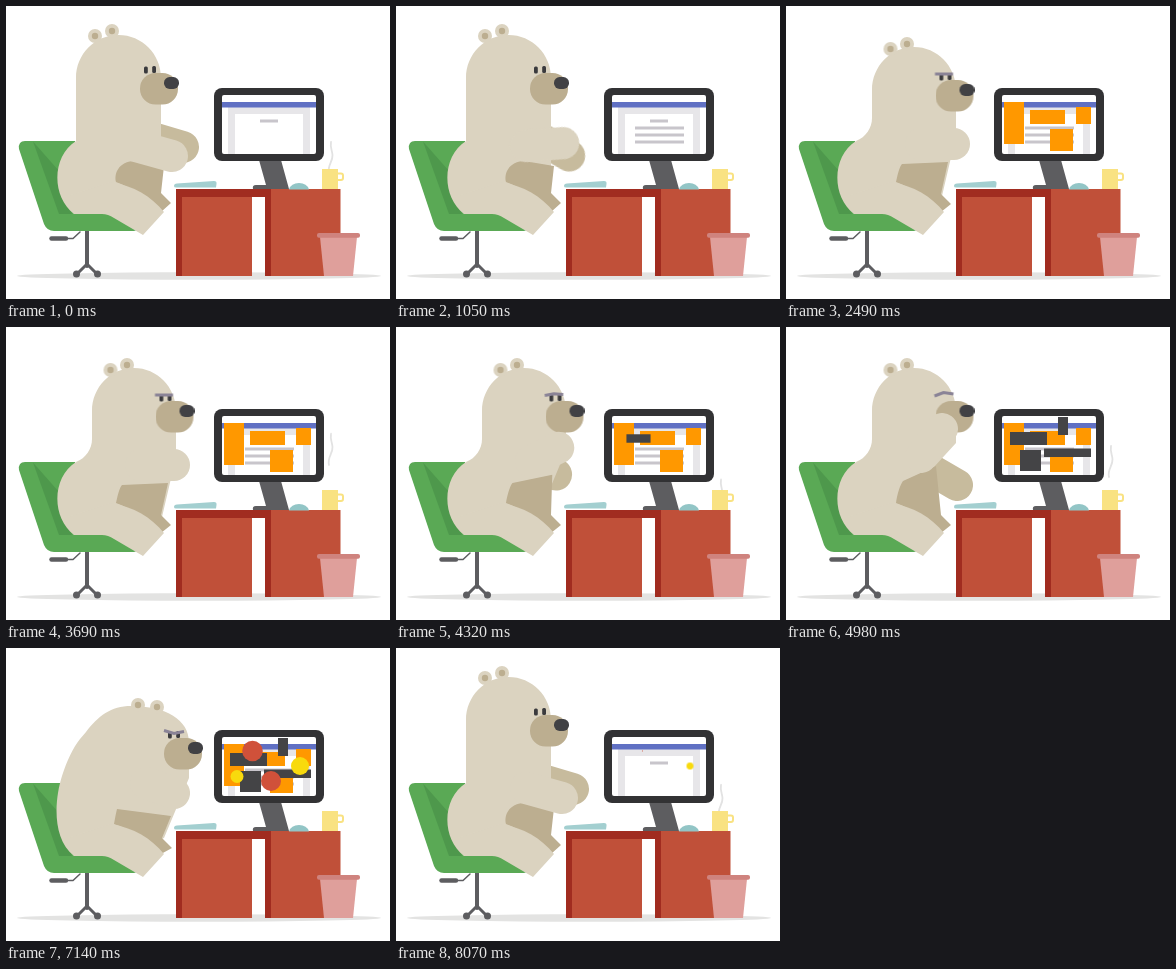
Animation, 384 px wide and 293 px high, one loop 8100 ms. Source, as an HTML page without scripts:

```html
<!DOCTYPE html>
<html lang="en">
<head>
<meta charset="utf-8">
<title>Bear at a desk</title>
<style>
html, body { margin: 0; width: 100%; height: 100%; overflow: hidden; background: #fff; }
svg { display: block; width: 100%; height: 100%; }

/* Poses: a upright, b leaning, d facepalm, u lift, c hunched */
.shape, .shift { animation: 8.1s ease-in-out infinite shape; }
.shift { animation-name: shift; }
@keyframes shape {
  0%, 21.6%, 98.5%, 100% { d: var(--a); }
  27.2%, 51.2%, 67.9%, 71.6% { d: var(--b); }
  55.6%, 63% { d: var(--d); }
  73.3% { d: var(--u, var(--b)); }
  75.6%, 93.7% { d: var(--c); }
}
@keyframes shift {
  0%, 21.6%, 98.5%, 100% { transform: var(--a); }
  27.2%, 51.2%, 55.6%, 63%, 67.9%, 71.6% { transform: var(--b); }
  73.3% { transform: var(--u); }
  75.6%, 93.7% { transform: var(--c); }
}

.body {
  --a: path("M68 208C45 190 46 150 70 135C70 133 70 126 70 120L70 72C70 48 89 29 112.5 29C136 29 155 48 155 72L155 120L155 190L110 208Z");
  --b: path("M68 208C45 190 46 150 70 135C80 131 86 122 86 112L86 84C86 60 105 41 128 41C151 41 170 60 170 84L170 130L156 190L110 208Z");
  --d: path("M68 208C45 190 46 150 70 135C80 131 86 122 86 112L86 84C86 60 105 41 128 41C151 41 170 60 170 84L170 116L148 140L110 208Z");
  --u: path("M68 208C45 190 46 150 70 134C80 128 86 119 86 106L86 77C86 53 105 34 128 34C151 34 170 53 170 77L170 130L156 190L110 208Z");
  --c: path("M68 208C45 190 49 150 56 128C61 112 67 100 74 91L80 84C92 68 105 58 125 58C160 58 183 72 183 94L183 130L158 190L110 208Z");
}
.belly {
  --a: path("M110 176C108 168 112 156 128 155L158 160L155 187L165 197L155 206C140 190 125 182 110 176Z");
  --b: path("M110 176C112 166 114 160 116 158L162 156L155 188L165 198L155 206C140 190 125 182 110 176Z");
  --d: path("M110 176C111 168 114 158 117 154L150 139L155 188L165 198L155 206C140 190 125 182 110 176Z");
  --c: path("M108 176C109 170 110 165 111 161L165 168L156 190L166 200L155 206C140 190 125 182 108 176Z");
}
.near {
  --a: path("M130 140L166 150");
  --b: path("M135 138L168 138");
  --d: path("M135 130L156 102");
  --c: path("M140 135L168 145");
}
.far {
  --a: path("M140 130L177 141");
  --b: path("M140 130L150 138");
  --d: path("M140 140L171 158");
  --c: path("M140 130L150 138");
}
.brow {
  --a: path("M133.5 60L142.5 60L151.5 60");
  --b: path("M133.5 61L142.5 61L151.5 61");
  --d: path("M133 62L142 58.5L152 60");
  --c: path("M134 59.5L144 62.5L154 60.5");
}
.ear1 { --a: translate(89px, 30px); --b: translate(104.5px, 43px); --u: translate(105px, 36px); --c: translate(132px, 57px); }
.ear2 { --a: translate(106px, 25px); --b: translate(121px, 38px); --u: translate(122px, 31px); --c: translate(151px, 59px); }
.face { --a: translate(0, 0); --b: translate(15.5px, 7px); --u: translate(15.5px, 1px); --c: translate(24px, 23px); }

.arm { fill: none; stroke-width: 32; stroke-linecap: round; }
.type { animation: type 8.1s ease-in-out infinite; }
@keyframes type {
  0%, 3.7%, 7.41%, 11.11%, 14.81%, 18.52%, 22.2%, 100% { transform: rotate(0deg); }
  1.85%, 5.56%, 9.26%, 12.96%, 16.67%, 20.37% { transform: rotate(var(--r)); }
}
.eyes { animation: eyes 8.1s step-end infinite; }
@keyframes eyes { 0%, 65.5% { opacity: 1; } 53.5% { opacity: 0; } }
.brow { animation: shape 8.1s ease-in-out infinite, brow 8.1s step-end infinite; }
@keyframes brow { 0%, 96% { opacity: 0; } 24% { opacity: 1; } }

/* Typed lines */
.line { transform-box: fill-box; transform-origin: left; animation: 8.1s linear infinite; }
@keyframes line1 { 0%, 1.5% { transform: scaleX(0); } 4.6%, 97% { transform: none; } 97.1%, 100% { transform: scaleX(0); } }
@keyframes line2 { 0%, 5% { transform: scaleX(0); } 8%, 97% { transform: none; } 97.1%, 100% { transform: scaleX(0); } }
@keyframes line3 { 0%, 8.5% { transform: scaleX(0); } 12%, 97% { transform: none; } 97.1%, 100% { transform: scaleX(0); } }

/* Pop-ups: transform brings them in, scale takes them out */
.pop > * {
  transform-box: fill-box; transform-origin: center;
  animation: var(--in) 8.1s ease-out var(--t, 0s) infinite backwards,
             out 8.1s linear var(--o, var(--t, 0s)) infinite backwards;
}
.pop > :nth-child(2) { --t: .12s; }
.pop > :nth-child(3) { --t: .24s; }
.pop > :nth-child(4) { --t: .36s; }
.wide { --in: in1; }
.dark { --in: in2; }
.dots { --in: in3; }
.dots > :nth-child(1) { --o: .26s; }
.dots > :nth-child(2) { --o: .33s; }
.dots > :nth-child(3) { --o: .4s; }
.dots > :nth-child(4) { --o: .425s; }
@keyframes in1 { 0%, 22% { transform: scale(0); } 23.8%, 100% { transform: scale(1); } }
@keyframes in2 { 0%, 52.5% { transform: scale(0); } 54.3%, 100% { transform: scale(1); } }
@keyframes in3 { 0%, 66% { transform: scale(0); } 67.8%, 100% { transform: scale(1); } }
@keyframes out { 0%, 93.83% { scale: 1; } 94.75%, 100% { scale: 0; } }

.steam { animation: steam 8.1s linear infinite; }
@keyframes steam {
  0% { transform: translateY(-1px); opacity: 1; }
  6% { transform: translateY(-14px); opacity: 1; }
  11% { transform: translateY(-24px); opacity: 0; }
  11.1%, 31.5% { transform: translateY(27px); opacity: 1; }
  45.5% { transform: translateY(-30px); opacity: 1; }
  48.8% { transform: translateY(-38px); opacity: 0; }
  48.9%, 50.6% { transform: translateY(27px); opacity: 1; }
  61.5% { transform: translateY(-18px); opacity: 1; }
  67.9% { transform: translateY(-36px); opacity: 0; }
  68%, 70.4% { transform: translateY(27px); opacity: 1; }
  75.9% { transform: translateY(0); opacity: 1; }
  83% { transform: translateY(-26px); opacity: 1; }
  87.6% { transform: translateY(-36px); opacity: 0; }
  87.7%, 92.6% { transform: translateY(27px); opacity: 1; }
  99.6% { transform: translateY(0); opacity: 1; }
  100% { transform: translateY(-1px); opacity: 1; }
}
</style>
</head>
<body>
<svg viewBox="0 0 384 293">
  <defs>
    <clipPath id="glass"><rect x="216" y="89" width="94" height="59" rx="2"/></clipPath>
    <g id="ear"><circle r="7" fill="#dbd3c0"/><circle r="3.2" fill="#bcae90"/></g>
  </defs>
  <ellipse cx="193" cy="270" rx="182" ry="3.7" fill="#e3e3e2"/>

  <!-- Chair -->
  <g fill="none" stroke="#5d5d60" stroke-linecap="round">
    <path d="M81 224V260" stroke-width="4"/>
    <path d="M71 268L81 258L91 268" stroke-width="3"/>
    <path d="M62 232.500H67L74 226" stroke-width="1.500"/>
    <path d="M45.500 232.500H60" stroke-width="4.500"/>
  </g>
  <g fill="#5d5d60"><circle cx="70.500" cy="268" r="3.500"/><circle cx="91.500" cy="268" r="3.500"/></g>
  <path d="M19 135H69V205H100L133 222Q131 225 128 225H48Q41 225 38 218L13 143Q12 135 19 135Z" fill="#5aa955"/>
  <path d="M27 135.500L53 208H66L53 165Z" fill="#4e984c"/>

  <!-- Steam -->
  <path class="steam" d="M323 168C321 160 327 157 326.500 150C326 145 324 142 325 137" fill="none" stroke="#e2e2e2" stroke-width="1.800" stroke-linecap="round"/>

  <!-- Desk -->
  <path d="M170 183H265V270H259V191H176V270H170Z" fill="#a12c20"/>
  <path d="M176 191H246V270H176ZM265 183H334.500V270H265Z" fill="#c05039"/>
  <path d="M316 163H332V183H316Z" fill="#f9e282"/>
  <path d="M332 167.500H335Q337 167.500 337 169.500V172Q337 174 335 174H332" fill="none" stroke="#f9e282" stroke-width="2"/>
  <path d="M283 183.500Q285 177 293 177T303 183.500Z" fill="#92c5c6"/>
  <path d="M314 231H351L347 270H318Z" fill="#df9f9b"/>
  <rect x="311" y="227" width="43" height="4.800" rx="2" fill="#cf837e"/>

  <!-- Monitor -->
  <path d="M253 154H275L283 183H247Q246 179 250 179H260Z" fill="#5d5d60"/>
  <rect x="208" y="82" width="110" height="73" rx="8" fill="#323234"/>
  <g clip-path="url(#glass)">
    <path d="M216 89H310V148H216Z" fill="#fff"/>
    <path d="M222 101H304V148H222Z" fill="#e7e6e9"/>
    <path d="M229 108H297V148H229Z" fill="#fff"/>
    <path d="M216 96H310V101.500H216Z" fill="#6070c3"/>
    <g fill="#c8c5cb">
      <path d="M254 113.500H272V116.500H254Z"/>
      <path class="line" style="animation-name:line1" d="M239 120.500H288V123.500H239Z"/>
      <path class="line" style="animation-name:line2" d="M239 127.500H288V130.500H239Z"/>
      <path class="line" style="animation-name:line3" d="M239 134.500H288V137.500H239Z"/>
    </g>
    <g class="pop wide" fill="#ff9800">
      <rect x="218" y="96" width="20" height="42"/>
      <rect x="244" y="104" width="35" height="14"/>
      <rect x="290" y="101" width="15" height="17"/>
      <rect x="264" y="123" width="23" height="22"/>
    </g>
    <g class="pop dark" fill="#444446">
      <rect x="224" y="105" width="37" height="13"/>
      <rect x="234" y="123" width="21" height="21"/>
      <rect x="258" y="121.500" width="47" height="8.500"/>
      <rect x="272" y="90" width="10" height="18"/>
    </g>
    <g class="pop dots" fill="#d0513a">
      <circle cx="265" cy="133" r="10"/>
      <circle cx="231" cy="128.500" r="6.500" fill="#f8da0d"/>
      <circle cx="246.500" cy="103" r="10.300"/>
      <circle cx="294" cy="118" r="9" fill="#f8da0d"/>
    </g>
  </g>

  <!-- Bear -->
  <g class="type" style="--r:14deg;transform-origin:140px 130px">
    <path class="shape arm far" d="M140 130L177 141" stroke="#c7bb9d"/>
  </g>
  <path d="M168 180Q168 177.500 171 177.500L208 175Q211 175 210.500 178L210 181.500H170Q168 181.500 168 180Z" fill="#a3cfd0"/>
  <path class="shape body" fill="#dbd3c0"/>
  <path class="shape belly" fill="#bcae90"/>
  <path d="M68 208H96Q102 208 108 212L137 229L158 206C145 190 128 180 105 176L62 190Z" fill="#dbd3c0"/>
  <use class="shift ear1" href="#ear"/>
  <use class="shift ear2" href="#ear"/>
  <g class="shift face">
    <g class="eyes" fill="#3a3a3d">
      <rect x="138" y="60.500" width="3.800" height="7" rx="1.500"/>
      <rect x="146.200" y="60" width="3.800" height="7" rx="1.500"/>
    </g>
    <rect x="134" y="67" width="38" height="31.500" rx="15.500" fill="#bcae90"/>
    <rect x="158" y="71" width="15" height="12" rx="5.700" fill="#414144"/>
    <path class="brow" fill="none" stroke="#8a8396" stroke-width="3"/>
  </g>
  <g class="type" style="--r:-20deg;transform-origin:130px 140px">
    <path class="shape arm near" d="M130 140L166 150" stroke="#dbd3c0"/>
  </g>
</svg>
</body>
</html>
```
